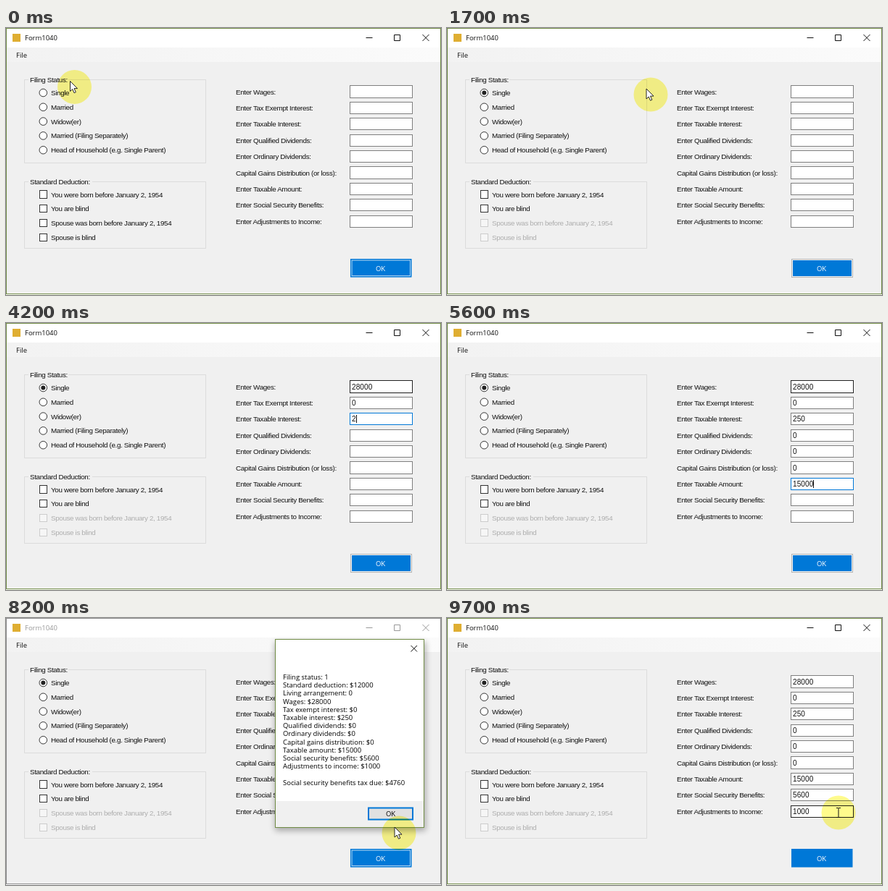
Write an HTML page that moves like this. It is 600 px wide and 369 px high and loops after 9800 ms.

```html
<!DOCTYPE html>
<html lang="en">
<head>
<meta charset="utf-8">
<title>Form1040</title>
<style>
  html, body { margin: 0; width: 100%; height: 100%; overflow: hidden; background: #fff; }
  svg { display: block; width: 100vw; height: 100vh; }
  text { font: 9.8px "Liberation Sans", Arial, sans-serif; letter-spacing: -.34px; white-space: pre; }
  .wide { font-size: 10px; letter-spacing: .1px; }
  .system { font: 500 9.47px "Open Sans", sans-serif; letter-spacing: 0; }
  .glow { mix-blend-mode: multiply; }
</style>
</head>
<body>
<svg id="stage" viewBox="0 0 600 369" xmlns="http://www.w3.org/2000/svg"></svg>
<script>
const LOOP = 9800, STEP = 100, BLINK = 530;
const SINGLE_AT = 800, RELEASE_AT = 1100, OK_AT = 7900, OPEN_AT = 8000, CLOSE_AT = 9400;
const HIDE_AT = 2800, SHOW_AT = 7400;
const BLUE = '#0078d7', OLIVE = '#718c46', INK = '#111';

const statuses = ['Single', 'Married', 'Widow(er)', 'Married (Filing Separately)',
  'Head of Household (e.g. Single Parent)'];
const deductions = ['You were born before January 2, 1954', 'You are blind',
  'Spouse was born before January 2, 1954', 'Spouse is blind'];

// label, value, focus time, first key time
const fields = [
  ['Enter Wages:', '28000', 2100, 2900],
  ['Enter Tax Exempt Interest:', '0', 3600, 3800],
  ['Enter Taxable Interest:', '250', 4000, 4200],
  ['Enter Qualified Dividends:', '0', 4600, 4700],
  ['Enter Ordinary Dividends:', '0', 4800, 4900],
  ['Capital Gains Distribution (or loss):', '0', 5000, 5100],
  ['Enter Taxable Amount:', '15000', 5100, 5200],
  ['Enter Social Security Benefits:', '5600', 5800, 5900],
  ['Enter Adjustments to Income:', '1000', 6300, 6400],
];
const report = ['Filing status: 1', 'Standard deduction: $12000', 'Living arrangement: 0',
  'Wages: $28000', 'Tax exempt interest: $0', 'Taxable interest: $250',
  'Qualified dividends: $0', 'Ordinary dividends: $0', 'Capital gains distribution: $0',
  'Taxable amount: $15000', 'Social security benefits: $5600',
  'Adjustments to income: $1000', '', 'Social security benefits tax due: $4760'];

// pointer path: time, x, y
const path = [[0, 94.5, 81.5], [600, 62, 97], [1300, 62, 97], [2100, 500, 87],
  [7400, 500, 87], [7800, 518, 331], [8000, 518, 331], [8200, 542, 297],
  [8500, 540, 269], [LOOP, 540, 269]];

const rect = (x, y, w, h, fill, stroke = 'none', extra = '') =>
  `<rect x="${x}" y="${y}" width="${w}" height="${h}" fill="${fill}" stroke="${stroke}" ${extra}/>`;
const line = (d, stroke, width = 1) =>
  `<path d="${d}" fill="none" stroke="${stroke}" stroke-width="${width}"/>`;
const text = (x, mid, str, fill = INK, extra = '') =>
  `<text x="${x}" y="${mid + 3.5}" fill="${fill}" ${extra}>${str}</text>`;
const fieldY = i => 88 + i * 22.4;
const rowY = (first, i) => first + i * 19.8;

// outlined box centred on y, with its edges on whole pixels
function box(x, y, w, h, fill, stroke) {
  const top = Math.round(y - h / 2), bottom = Math.round(y + h / 2);
  return rect(x + .5, top + .5, w - 1, bottom - top - 1, fill, stroke);
}

function pointer(t) {
  const i = Math.max(1, path.findIndex(p => p[0] >= t));
  const [t0, x0, y0] = path[i - 1], [t1, x1, y1] = path[i];
  const u = (t - t0) / (t1 - t0), e = u * u * (3 - 2 * u);
  return { x: x0 + (x1 - x0) * e, y: y0 + (y1 - y0) * e };
}

function windowFrame(modal) {
  const ink = modal ? '#999' : INK, edge = modal ? '#8a8a8a' : OLIVE;
  return rect(0, 0, 600, 369, '#fff') + rect(0, 27, 600, 341, '#f0f0f0') +
    '<linearGradient id="menu"><stop stop-color="#f2f2f2"/><stop offset="1" stop-color="#fbfbfb"/></linearGradient>' +
    rect(1, 27, 598, 20, 'url(#menu)') +
    rect(.5, .5, 599, 367, 'none', edge) +
    rect(9, 8, 11, 11, '#dfae32') +
    text(26, 13.5, 'Form1040', ink, 'class="system"') +
    text(14, 37.5, 'File', INK, 'class="system"') +
    line('M496.5 13.5h9M535.5 9.5h8v8h-8zM574.5 9l9 9m0-9l-9 9', ink);
}

function group(title, y, h, width) {
  return rect(25.5, y + .5, 250, h, 'none', '#dcdcdc') +
    rect(31, y - 4, width, 9, '#f0f0f0') + text(33, y + .5, title);
}

function choices(t) {
  const chosen = t >= SINGLE_AT, pressed = chosen && t < RELEASE_AT;
  let s = group('Filing Status:', 71, 115, 55);
  statuses.forEach((label, i) => {
    const y = rowY(89.5, i), on = chosen && !i, hot = on && pressed;
    s += `<circle cx="51.3" cy="${y}" r="5.3" fill="${hot ? '#ccc' : '#fff'}" stroke="${hot ? '#555' : '#333'}"/>`;
    if (on) s += `<circle cx="51.3" cy="${y}" r="3" fill="${hot ? '#666' : '#222'}"/>`;
    s += text(62, y, label);
  });
  s += group('Standard Deduction:', 212, 92, 88);
  deductions.forEach((label, i) => {
    const y = rowY(230, i), off = chosen && i > 1;
    s += box(46, y, 11, 11.2, off ? '#f6f6f6' : '#fff', off ? '#ccc' : '#333') +
      text(62, y, label, off ? '#adadad' : INK);
  });
  return s;
}

function inputs(t, hover) {
  const focus = t < OK_AT ? fields.filter(f => t >= f[2]).length - 1 : -1;
  return fields.map(([label, value, start, key], i) => {
    const y = fieldY(i);
    const count = Math.min(value.length, Math.max(0, (t - key) / STEP + 1));
    const typed = value.slice(0, count);
    const edge = i === focus ? BLUE : i === hover ? '#222' : '#7f7f7f';
    let s = text(317, y, label) + box(474, y, 87, 17.2, '#fff', edge) +
      text(477, y, typed, INK, 'class="wide"');
    const last = count ? key + (count - 1) * STEP : start;
    if (i === focus && (t - last) % (2 * BLINK) < BLINK) {
      const x = Math.round(477 + typed.length * 5.66) + .5;
      s += line(`M${x} ${Math.round(y - 5.5)}v11`, INK);
    }
    return s;
  }).join('');
}

function okButton(t) {
  const focused = t < SINGLE_AT || t >= OK_AT;
  let s = focused
    ? rect(475, 319, 84.5, 25.5, BLUE) +
      (t < CLOSE_AT ? rect(477, 321, 80.5, 21.5, 'none', '#b4d6f2') : '')
    : rect(475.5, 319.5, 84, 25, '#f4f4f4', '#b4b4b4') + rect(477, 321, 81, 22, BLUE);
  return s + text(516.5, 332, 'OK', '#fff', 'class="system" text-anchor="middle"');
}

function dialog() {
  return '<filter id="soft"><feGaussianBlur stdDeviation="4"/></filter>' +
    rect(371, 33, 208, 261, '#000', 'none', 'opacity=".3" filter="url(#soft)"') +
    rect(371.5, 29.5, 205, 260, '#fff', OLIVE) + rect(372, 253, 204, 36, '#f0f0f0') +
    line('M558.5 38l8.5 8.5m0-8.5l-8.5 8.5', INK) +
    report.map((str, i) => text(382, 81.5 + i * 11.2, str, '#000', 'class="system"')).join('') +
    rect(500, 262.5, 61, 16, '#e1e1e1', BLUE, 'stroke-width="2"') +
    text(530.5, 270.5, 'OK', '#000', 'class="system" text-anchor="middle"');
}

function cursor({ x, y }, beam) {
  return `<circle class="glow" cx="${x}" cy="${y}" r="23.5" fill="#fffb8c"/>` +
    `<g transform="translate(${x} ${y})">` + (beam
      ? line('M-3 -6.5h2.5l.5 .5l.5 -.5h2.5M0 -6v12M-3 6.5h2.5l.5 -.5l.5 .5h2.5', INK)
      : '<path d="M-6 -8v14l3.2 -3l2.3 5.2l2.3 -1l-2.3 -5.1h4.5z" fill="#fff" stroke="#111" stroke-width=".9"/>') +
    '</g>';
}

function draw(t) {
  const modal = t >= OPEN_AT && t < CLOSE_AT, p = pointer(t);
  const hover = modal || p.x < 474 || p.x > 560 ? -1
    : fields.findIndex((f, i) => Math.abs(p.y - fieldY(i)) < 9);
  let s = windowFrame(modal) + choices(t) + inputs(t, hover) + okButton(t);
  if (modal) s += dialog();
  if (t < HIDE_AT || t >= SHOW_AT) s += cursor(p, hover >= 0);
  stage.innerHTML = s;
}

const stage = document.getElementById('stage');
const begin = performance.now();
let shown = -1;
function tick() {
  const t = Math.floor((performance.now() - begin) % LOOP / STEP) * STEP;
  if (t !== shown) draw(shown = t);
  requestAnimationFrame(tick);
}
tick();
</script>
</body>
</html>
```
